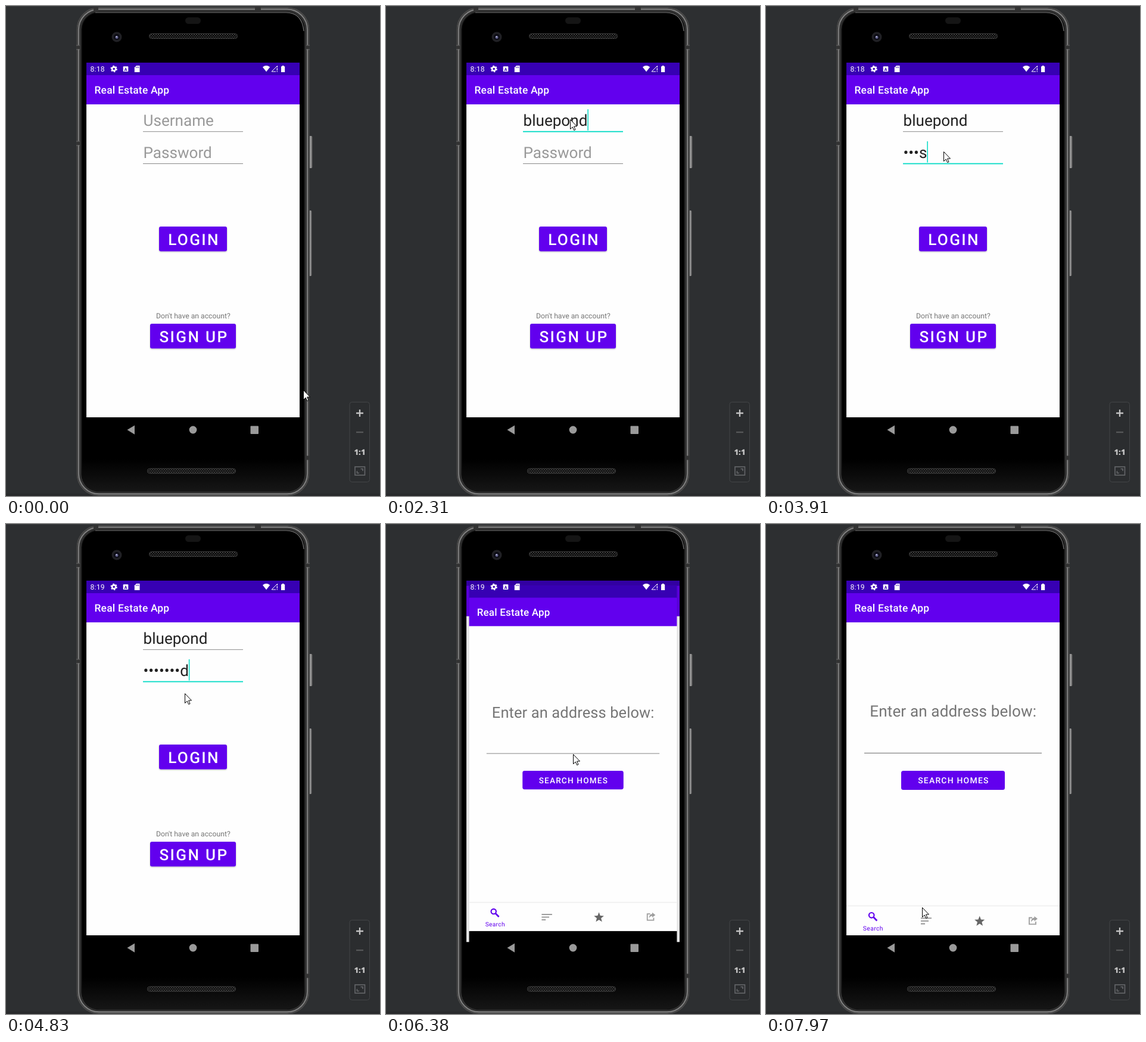
An HTML page for the animation above (8000 ms loop, 628x822 px).

```html
<!DOCTYPE html>
<html lang="en">
<head>
<meta charset="utf-8">
<title>Login demo</title>
<style>
  html, body { margin: 0; width: 628px; height: 822px; overflow: hidden; background: #2d2f31; }
  svg { display: block; }
  text { font-family: Roboto, sans-serif; white-space: pre; text-rendering: geometricPrecision; }
  .mid { text-anchor: middle; }
  .title { font-size: 17.4px; font-weight: 500; letter-spacing: .0125em; fill: #fff; }
  .big { font-size: 26.1px; }
  .btn { font-weight: 500; letter-spacing: .0893em; fill: #fff; }
  .hint { fill: #999; }
  .ink { fill: #212121; }
  .grey { fill: #757575; }
</style>
</head>
<body>
<svg width="628" height="822" viewBox="0 0 628 822">
  <defs>
    <clipPath id="screen"><rect x="135" y="95" width="358" height="636"/></clipPath>
    <clipPath id="loginBox"><rect x="257" y="370" width="114" height="41.5" rx="3"/></clipPath>
    <pattern id="mesh" width="4" height="4" patternUnits="userSpaceOnUse">
      <path d="M0 0L2 2L4 0M0 4L2 2L4 4" fill="none" stroke="#444" stroke-width=".8"/>
    </pattern>
    <linearGradient id="key">
      <stop offset="0" stop-color="#444"/><stop offset=".55" stop-color="#a0a0a0"/><stop offset="1" stop-color="#555"/>
    </linearGradient>
    <linearGradient id="chin" x2="0" y2="1">
      <stop offset="0" stop-color="#000"/><stop offset="1" stop-color="#161616"/>
    </linearGradient>
    <filter id="shade" x="-10%" y="-20%" width="120%" height="150%">
      <feDropShadow dx="0" dy="1" stdDeviation=".8" flood-opacity=".28"/>
    </filter>
    <g id="bars">
      <rect x="135" y="164" width="358" height="526" fill="#fefefe"/>
      <rect x="135" y="95" width="358" height="22" fill="#3700b3"/>
      <rect x="135" y="116" width="358" height="49" fill="#6200ee"/>
      <rect x="135" y="690" width="358" height="41"/>
      <text class="title" x="148.5" y="147">Real Estate App</text>
    </g>
  </defs>

  <rect width="628" height="822" fill="#2d2f31"/>
  <path d="M0 .5H628" stroke="#3a3c3e"/>
  <path d="M0 820H628" stroke="#292a2c" stroke-width="4"/>

  <!-- phone body -->
  <rect x="508" y="218" width="6.5" height="54" rx="2" fill="url(#key)"/>
  <rect x="508" y="343" width="5.5" height="110" rx="2" fill="url(#key)"/>
  <rect x="118.5" y="2" width="391" height="820" rx="37" fill="#1a1a1a"/>
  <g fill="none">
    <rect x="119.5" y="3" width="389" height="818" rx="36" stroke="#4a4a4a" stroke-width="2"/>
    <rect x="122" y="5.5" width="384" height="813" rx="34" stroke="#7c7c7c" stroke-width="2.4"/>
    <rect x="125" y="8.5" width="378" height="807" rx="31" stroke="#333" stroke-width="2"/>
  </g>
  <rect x="127" y="10.5" width="374" height="804" rx="29" fill="#000" stroke="#1c1c1c"/>
  <path d="M150 11H470Q497 11 500 42" fill="none" stroke="#777" stroke-width="1.2"/>
  <path d="M128 760V786Q129 814 157 814H471Q499 814 500 786V760Z" fill="url(#chin)"/>
  <path d="M119 69H124M119 230H124M504 69H509M504 758H509M418 4H428M147 5H155" stroke="#333" stroke-width="7"/>
  <path d="M118 66H124M118 73H124M118 227H124M118 234H124M504 66H510M504 73H510" stroke="#777" stroke-width=".8"/>
  <rect x="301" y="19" width="26" height="11" rx="5.5" fill="#151515"/>
  <circle cx="186" cy="52" r="8.5" fill="#202024"/>
  <circle cx="186" cy="52" r="5" fill="#0b0b14"/>
  <circle cx="186" cy="52.5" r="2.5" fill="#5c5c88"/>
  <circle cx="185.5" cy="51.5" r="1.1" fill="#d0d0e8"/>
  <g fill="url(#mesh)" stroke="#484848" stroke-width=".9">
    <rect x="240.5" y="46.5" width="148" height="8" rx="4"/>
    <rect x="237.5" y="776" width="148" height="8" rx="4"/>
  </g>

  <g clip-path="url(#screen)">
    <rect x="135" y="95" width="358" height="636"/>
    <g id="login">
      <use href="#bars"/>
      <text class="big" id="user" x="230.5" y="201"></text>
      <text class="big" id="pass" x="230.5" y="254.5"></text>
      <rect id="userLine" x="230" width="168"/>
      <rect id="passLine" x="230" width="168"/>
      <rect id="caret" width="1.5" height="35.5" fill="#03dac5"/>
      <rect id="loginBtn" x="257" y="370" width="114" height="41.5" rx="3" fill="#6200ee" filter="url(#shade)"/>
      <circle id="ripple" cx="317" cy="388" fill="#fff" clip-path="url(#loginBox)"/>
      <text class="big btn mid" x="315.5" y="401">LOGIN</text>
      <text class="grey mid" x="314.3" y="524" font-size="12.2">Don't have an account?</text>
      <rect x="242" y="533" width="144" height="41.5" rx="3" fill="#6200ee" filter="url(#shade)"/>
      <text class="big btn mid" x="315.5" y="564">SIGN UP</text>
      <rect id="dim" x="135" y="95" width="358" height="595"/>
    </g>
    <g id="home">
      <use href="#bars"/>
      <text class="big grey mid" x="314.2" y="323" letter-spacing=".12">Enter an address below:</text>
      <path d="M165 384.3H463" stroke="#858585" stroke-width="1.2"/>
      <rect x="227" y="414" width="174" height="32" rx="3.5" fill="#6200ee"/>
      <text class="btn mid" x="314.9" y="435.3" font-size="13.92">SEARCH HOMES</text>
      <path d="M135 640.5H493" stroke="#f1f1f1" stroke-width="2"/>
      <g fill="none" stroke="#6200ee" stroke-width="2.2">
        <circle cx="177.2" cy="656.3" r="4.3"/><path d="M180.5 659.6L186.3 665.4" stroke-width="2.8"/>
      </g>
      <text class="mid" x="179.8" y="681.5" font-size="10.4" letter-spacing=".35" fill="#6200ee">Search</text>
      <path d="M260 661.3H278M260 666H273M260 670.6H267" stroke="#9e9e9e" stroke-width="2.1"/>
      <path id="star" fill="#666"/>
      <path d="M447 660.5H442V671.3H453V667" fill="none" stroke="#9e9e9e" stroke-width="1.8"/>
      <path d="M450.5 658L456 662.3L450.5 666.5V664Q447 664 445 668Q445 661 450.5 660.6Z" fill="#9e9e9e"/>
    </g>
  </g>

  <!-- status icons -->
  <g fill="#fff">
    <text id="clock" x="141.5" y="110" font-size="12.2" letter-spacing=".2"></text>
    <circle cx="181.2" cy="105.5" r="3.1" fill="none" stroke="#fff" stroke-width="2.6"/>
    <circle cx="181.2" cy="105.5" r="4.8" fill="none" stroke="#fff" stroke-width="1.8" stroke-dasharray="2.5 2.53"/>
    <rect x="196.7" y="101.2" width="8.6" height="8.8" rx="1"/>
    <text class="mid" x="201" y="108.5" font-size="7.5" font-weight="700" style="fill:#3700b3">A</text>
    <path d="M219 100H224.5V111H215.8V103.2Z"/>
    <path d="M218.5 102V104M220.5 101.5V104M222.5 101.5V104" stroke="#3700b3" stroke-width=".8"/>
    <path d="M431 102.5Q437 97.6 443.2 102.5L437.1 110.3Z"/>
    <path d="M446 110L455.5 100.5V103M446 110H453" fill="none" stroke="#fff" stroke-width="1"/>
    <path d="M455.3 104V108M455.3 109V110.5" stroke="#fff" stroke-width="1.2"/>
    <path d="M462 101.3H463.7V100H466.5V101.3H468.2V111H462Z"/>
  </g>
  <g fill="#9a9a9a">
    <path d="M203.5 711L216 703.5V718.7Z"/>
    <circle cx="314" cy="711" r="6.4"/>
    <rect x="410.5" y="704.5" width="13.5" height="13.5" rx="1"/>
  </g>

  <!-- zoom panel -->
  <rect x="577" y="664.5" width="33.5" height="134" rx="4" fill="#2b2d2f" stroke="#434547"/>
  <path d="M588 683H600M594 677V689" stroke="#c2c2c2" stroke-width="2.3"/>
  <path d="M588 715H600" stroke="#565859" stroke-width="2.3"/>
  <text class="mid" x="594" y="752.5" font-size="13" font-weight="800" fill="#c2c2c2" style="font-family:'Open Sans',sans-serif">1:1</text>
  <g fill="none" stroke="#65676a" stroke-width="1.6">
    <rect x="586" y="773" width="16.5" height="14"/>
    <path d="M589.5 780V783.5H593M595.5 776.5H599V780"/>
  </g>

  <path id="cursor" d="M.5.5V16.5L4.2 13L6.7 18.5L9 17.5L6.6 12H11.5Z" fill="#fff" stroke="#000"/>
</svg>
<script>
const el = Object.fromEntries([...document.querySelectorAll("svg [id]")].map(e => [e.id, e]));
const set = (e, attrs) => { for (const k in attrs) e.setAttribute(k, attrs[k]); };
const clamp = v => Math.max(0, Math.min(1, v));
const LOOP = 8000, FOCUS_USER = 715, FOCUS_PASS = 3110, PRESS = 5560, OPEN = 6264, OPENED = 6650;
const NAME = "bluepond", SECRET = "password";
const nameKeys = [1440, 1510, 1580, 1720, 1800, 1890, 1970, 2050];
const passKeys = [3570, 3640, 3710, 3910, 4060, 4150, 4240, 4440];

// first step time, last step time, step count, waypoints
const moves = [
  [0, 0, 1, [[499, 644], [499, 644]]],
  [70, 250, 4, [[499, 644], [299, 222]]],
  [450, 780, 6, [[299, 222], [309, 191]]],
  [2310, 2310, 1, [[309, 191], [309, 190]]],
  [2510, 3180, 11, [[309, 190], [298, 244]]],
  [4830, 4830, 1, [[298, 244], [300, 284]]],
  [4896, 5620, 12, [[300, 284], [314, 386]]],
  [6850, 6850, 1, [[314, 386], [314, 385]]],
  [7110, 7900, 13, [[314, 385], [314, 382], [290, 450], [250, 570], [244, 610], [259, 633]]],
  [7970, 7970, 1, [[259, 633], [262, 643]]],
];

set(el.star, { d: "M" + Array.from({ length: 10 }, (_, i) => {
  const r = i % 2 ? 3.9 : 9, a = i * Math.PI / 5;
  return [358.7 + r * Math.sin(a), 666.6 - r * Math.cos(a)];
}).join("L") + "Z" });

function cursorAt(t) {
  const [a, b, n, pts] = moves.filter(m => m[0] <= t).pop();
  const k = Math.min(n, Math.floor((t - a) / ((b - a) / (n - 1) || 1)) + 1);
  const u = 1 - (1 - k / n) ** 1.6;
  const s = u * (pts.length - 1), i = Math.min(pts.length - 2, Math.floor(s));
  return pts[i].map((v, j) => Math.round(v + (pts[i + 1][j] - v) * (s - i)));
}

// fast start, very slow finish: two joined cubic curves
function slowIn(x) {
  const [X, Y] = x < 1 / 6
    ? [[0, .05, .1333, 1 / 6], [0, 0, .06, .4]]
    : [[1 / 6, .2083, .25, 1], [.4, .82, 1, 1]];
  const at = ([p, q, r, s], u, v = 1 - u) => p * v ** 3 + 3 * q * u * v * v + 3 * r * u * u * v + s * u ** 3;
  let lo = 0, hi = 1;
  for (let i = 0; i < 24; i++) {
    const mid = (lo + hi) / 2;
    if (at(X, mid) < x) lo = mid; else hi = mid;
  }
  return at(Y, lo);
}

function field(text, hint, value) {
  text.textContent = value || hint;
  text.setAttribute("class", "big " + (value ? "ink" : "hint"));
  return value ? text.getComputedTextLength() : 0;
}

const underline = (line, mid, focused) => set(line, {
  y: mid - (focused ? .9 : .5),
  height: focused ? 1.8 : 1,
  fill: focused ? "#03dac5" : "#8a8a8a",
});

const scaleAbout = s => `translate(314 413) scale(${s}) translate(-314 -413)`;
const shown = on => on ? "visible" : "hidden";

function draw(t) {
  const typed = keys => keys.filter(k => k <= t).length;
  const n = typed(passKeys), inUser = t >= FOCUS_USER && t < FOCUS_PASS, inPass = t >= FOCUS_PASS;
  const hidden = n === 8 && t >= passKeys[7] + 1500 ? n : n - 1;
  const nameWidth = field(el.user, "Username", NAME.slice(0, typed(nameKeys)));
  const passWidth = field(el.pass, "Password", n ? "•".repeat(hidden) + SECRET.slice(hidden, n) : "");
  underline(el.userLine, 210.7, inUser);
  underline(el.passLine, 264.5, inPass);

  const lastKey = [FOCUS_USER + 35, ...nameKeys, FOCUS_PASS, ...passKeys].filter(k => k <= t).pop() ?? t;
  set(el.caret, {
    x: 230.5 + (inPass ? passWidth : nameWidth),
    y: inPass ? 227 : 173.3,
    visibility: shown((inUser || inPass) && t < OPENED && (t - lastKey) % 1000 < 500),
  });

  set(el.ripple, {
    r: 78 * clamp((t - PRESS) / 225),
    opacity: .2 * clamp((6250 - t) / 350),
  });
  el.clock.textContent = t < 4150 ? "8:18" : "8:19";

  // the screen change advances in 70 ms steps
  const step = 6310 + 70 * Math.floor((t - 6310) / 70);
  const p = t < OPENED ? slowIn(clamp((step - OPEN) / 400)) : 1;
  set(el.login, { transform: scaleAbout(1 + .05 * p), visibility: shown(t < OPENED) });
  set(el.dim, { opacity: .12 * p });
  set(el.home, { transform: scaleAbout(.85 + .15 * p), opacity: clamp((step - OPEN - 35) / 50) });
  set(el.cursor, { transform: `translate(${cursorAt(t)})` });
}

function frame() {
  draw(performance.now() % LOOP);
  requestAnimationFrame(frame);
}
frame();
</script>
</body>
</html>
```
